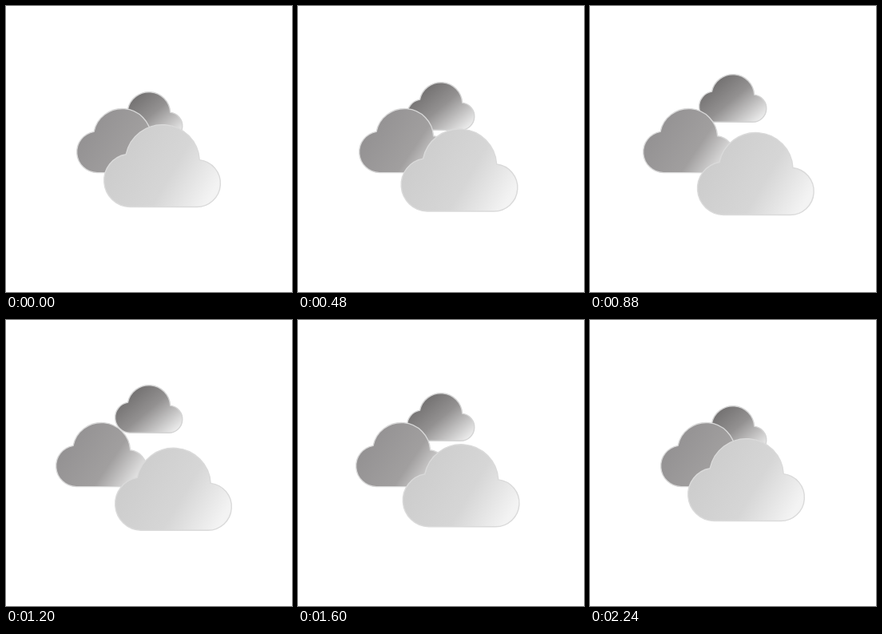
Animation, 358 px wide and 358 px high, one loop 2320 ms. Source, as an HTML page:

```html
<!DOCTYPE html>
<html lang="en">
<head>
<meta charset="utf-8">
<title>Clouds</title>
<style>
  html, body { margin: 0; width: 100%; height: 100%; overflow: hidden; background: #fff; }
  svg { display: block; width: 100vw; height: 100vh; }
  use { stroke-width: 1.4; }
</style>
</head>
<body>
<svg viewBox="0 0 358 358">
  <defs>
    <path id="cloud" vector-effect="non-scaling-stroke"
      d="M33 104A33.5 33.5 0 0 1 27.97 37.5A47 47 0 0 1 120.93 44.5A29.85 29.85 0 0 1 117 104Z"/>
    <linearGradient id="dark" gradientUnits="userSpaceOnUse" x1="40" y1="15" x2="120" y2="110">
      <stop offset="0" stop-color="#747272"/>
      <stop offset=".42" stop-color="#939191"/>
      <stop offset="1" stop-color="#ececec"/>
    </linearGradient>
    <linearGradient id="mid" gradientUnits="userSpaceOnUse" x1="25" y1="25" x2="135" y2="100">
      <stop offset="0" stop-color="#949293"/>
      <stop offset=".56" stop-color="#a19f9f"/>
      <stop offset="1" stop-color="#eeeeee"/>
    </linearGradient>
    <linearGradient id="light" gradientUnits="userSpaceOnUse" x1="25" y1="25" x2="135" y2="90">
      <stop offset="0" stop-color="#cdcdcd"/>
      <stop offset=".55" stop-color="#d6d6d6"/>
      <stop offset="1" stop-color="#f3f3f3"/>
    </linearGradient>
  </defs>
  <use href="#cloud" fill="url(#dark)" stroke="#d4d4d4"/>
  <use href="#cloud" fill="url(#mid)" stroke="#d8d8d8"/>
  <use href="#cloud" fill="url(#light)" stroke="#dadada"/>
</svg>
<script>
  const STEP = 80, COUNT = 29, TURN = 14;
  // Start position, scale and drift per step, back to front
  const clouds = [
    { x: 136.5, y: 107.7, scale: .572, dx: 0, dy: -2 },
    { x: 88.5, y: 128.5, scale: .77, dx: -2, dy: 0 },
    { x: 122.5, y: 148.6, scale: .99, dx: 15 / TURN, dy: 12.6 / TURN }
  ];
  const shapes = document.querySelectorAll('use');

  function draw(time) {
    const tick = Math.floor(time / STEP) % COUNT;
    const drift = TURN - Math.abs(TURN - tick);
    clouds.forEach((c, i) => {
      const x = c.x + c.dx * drift, y = c.y + c.dy * drift;
      shapes[i].setAttribute('transform', `translate(${x} ${y}) scale(${c.scale})`);
    });
  }

  let start;
  function frame(now) {
    start ??= now;
    draw(now - start);
    requestAnimationFrame(frame);
  }
  draw(0);
  requestAnimationFrame(frame);
</script>
</body>
</html>
```
